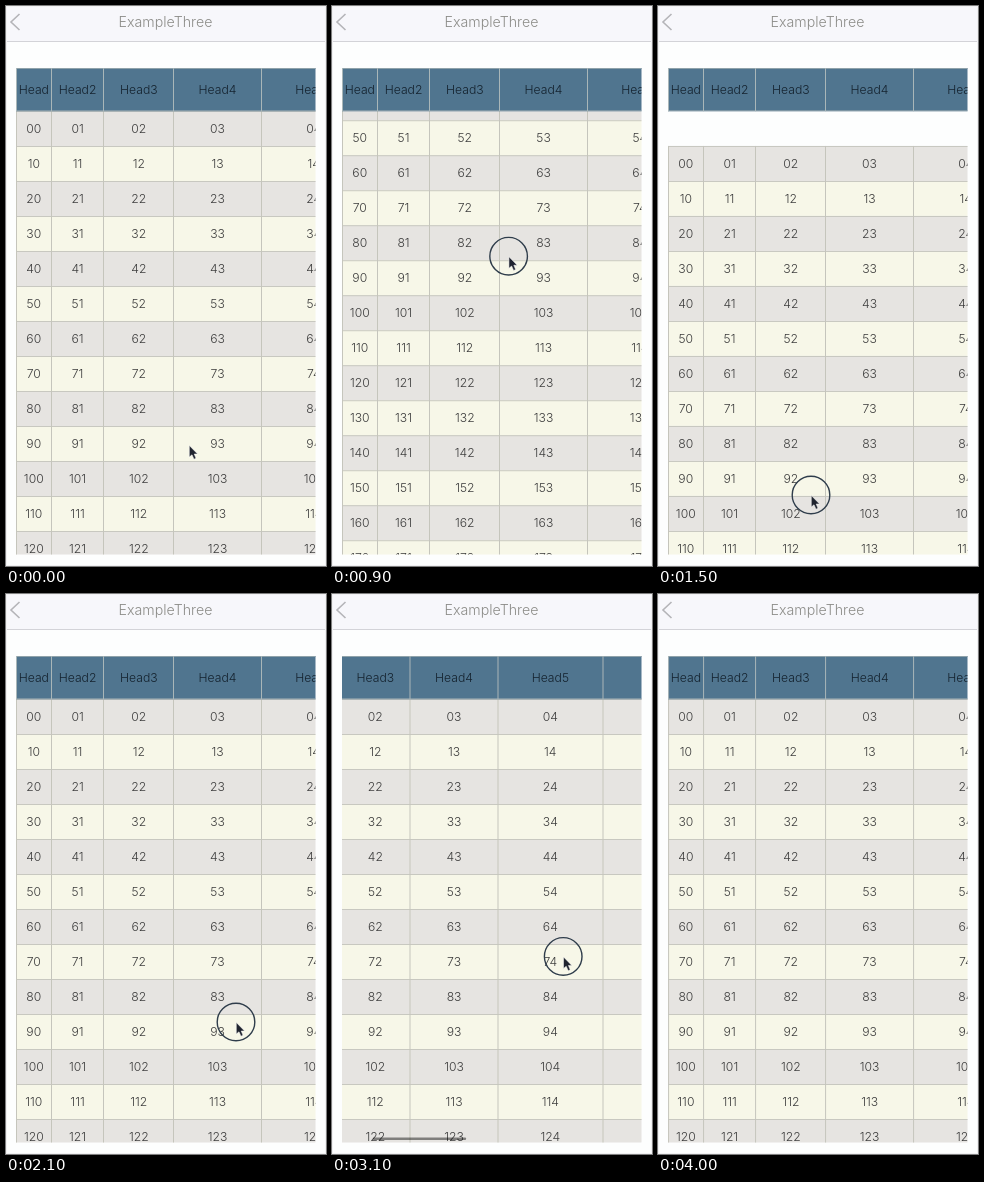
Write an HTML page that moves like this. It is 320x560 px and loops after 4.1 s.

```html
<!DOCTYPE html>
<html lang="en">
<head>
<meta charset="utf-8">
<title>ExampleThree</title>
<style>
  html, body { margin: 0; width: 100%; height: 100%; overflow: hidden; background: #fdfefe; }
  svg { display: block; width: 320px; height: 560px; }
  text { font: 300 12.2px Inter, "Open Sans", sans-serif; text-anchor: middle; fill: #3c3c3c; }
  .head text { fill: #14222e; }
  .title { font-size: 14.2px; fill: #8c8c88; }
</style>
</head>
<body>
<svg id="stage" viewBox="0 0 320 560">
  <defs>
    <clipPath id="headClip"><rect x="10" y="62" width="299.5" height="43.5"/></clipPath>
    <clipPath id="bodyClip"><rect x="10" y="105" width="299.5" height="443.5"/></clipPath>
  </defs>
  <rect width="320" height="560" fill="#fdfefe"/>
  <rect width="320" height="35" fill="#f7f7fb"/>
  <rect y="35" width="320" height="1" fill="#d3d3d8"/>
  <polyline points="13.5,8 5,16 13.5,24" fill="none" stroke="#b4b4b8" stroke-width="1.6"/>
  <text class="title" x="159.5" y="21">ExampleThree</text>
  <g clip-path="url(#bodyClip)"><g id="body"></g></g>
  <g clip-path="url(#headClip)"><g id="head" class="head"></g></g>
  <rect id="bar" y="543.5" height="2.4" rx="1.2" fill="#000" fill-opacity=".45"/>
  <g id="pointer">
    <circle id="ring" r="18.8" fill="none" stroke="#2f3d4b" stroke-width="1.4"/>
    <path d="M.3 .5V12L3 9.8L5 14.2L7 13.3L5.2 9H8.6Z" fill="#20242f" stroke="#fff" stroke-opacity=".7" stroke-width=".7"/>
  </g>
  <rect x=".5" y=".5" width="319" height="559" fill="none" stroke="#f0f0f2"/>
</svg>
<script>
const LOOP = 4100, STEP = 100;
const LEFT = 10, TOP = 105, ROW = 35, ROWS = 22, COLS = 9;
const VIEW_W = 300, VIEW_H = 443;
const $ = id => document.getElementById(id);

// Each column is half a row height wider than the one before it.
const colX = i => LEFT + ROW / 4 * i * (i + 3);
const tableW = colX(COLS) - LEFT;

function add(parent, tag, attrs, label) {
  const el = document.createElementNS('http://www.w3.org/2000/svg', tag);
  for (const k in attrs) el.setAttribute(k, attrs[k]);
  if (label !== undefined) el.textContent = label;
  parent.appendChild(el);
}
const box = (g, x, y, width, height, fill) => add(g, 'rect', { x, y, width, height, fill });
const label = (g, col, y, s) => add(g, 'text', { x: (colX(col) + colX(col + 1)) / 2 + .3, y }, s);

function columnLines(g, y, h, color) {
  for (let c = 0; c <= COLS; c++) box(g, Math.floor(colX(c)), y, 1, h, color);
}

function build() {
  const head = $('head'), body = $('body');
  box(head, LEFT, 62, tableW, 43.5, '#50758f');
  box(head, LEFT, 62, tableW, 1, '#8fa2aa');
  box(head, LEFT, 104.5, tableW, 1, '#a9b5b8');
  columnLines(head, 62, 43.5, '#a9b6b8');
  for (let c = 0; c < COLS; c++) label(head, c, 88, 'Head' + (c ? c + 1 : ''));

  for (let r = 0; r < ROWS; r++) {
    const y = TOP + r * ROW;
    box(body, LEFT, y, tableW, ROW, r % 2 ? '#f7f7e8' : '#e6e4e1');
    box(body, LEFT, y, tableW, 1, '#c8c8c0');
    for (let c = 0; c < COLS; c++) label(body, c, y + 22.2, `${r}${c}`);
  }
  columnLines(body, TOP, ROWS * ROW, '#c5c5bc');
}

const progress = (t, from, to) => Math.min(1, Math.max(0, (t - from) / (to - from)));
const smooth = k => k * k * (3 - 2 * k);
const mix = (a, b, k) => a + (b - a) * k;

// Where the hand turns or rests: time, x, y
const STOPS = [
  [0, 183, 439], [200, 182, 416], [700, 181, 206], [1500, 153, 489], [2100, 230, 428],
  [2400, 105, 405], [2700, 193, 367], [3400, 256, 359.5], [3900, 242, 543]
];
const GRAB = 200, DROP = 1500, FLICK = 2100, FLICK_BACK = 2900, EDGE = 3300;
const REACH = 195;
const within = (t, from, length) => t >= from && t <= from + length;

function pointerAt(t) {
  const i = Math.max(1, STOPS.findIndex(s => s[0] >= t));
  const [t0, x0, y0] = STOPS[i - 1], [t1, x1, y1] = STOPS[i];
  const k = smooth(progress(t, t0, t1));
  return [mix(x0, x1, k), mix(y0, y1, k)];
}

// Pulling past the top edge meets growing resistance.
function rubber(d) {
  const k = -d * .52 / VIEW_H;
  return d >= 0 ? d : -VIEW_H * k / (1 + k);
}

function scrollY(t) {
  if (t < GRAB) return 0;
  const pull = rubber(STOPS[1][2] - pointerAt(Math.min(t, DROP))[1]);
  return pull * (1 - progress(t, DROP, DROP + 400)) ** 2;
}

// A flick that glides out, then one back that overshoots and settles.
function scrollX(t) {
  if (t < FLICK_BACK) return REACH * (1 - (1 - progress(t, FLICK, 2700)) ** 2);
  if (t < EDGE) return mix(REACH, -16, smooth(progress(t, FLICK_BACK, EDGE)));
  return -16 * Math.exp((EDGE - t) / 132);
}

function draw(t) {
  const [px, py] = pointerAt(Math.min(t, 3900));
  const sx = scrollX(t), sy = scrollY(t);
  $('head').setAttribute('transform', `translate(${-sx} 0)`);
  $('body').setAttribute('transform', `translate(${-sx} ${-sy})`);

  const pressed = within(t, GRAB, DROP - GRAB) || within(t, FLICK - 100, 300) || within(t, FLICK_BACK, 200);
  $('pointer').setAttribute('transform', `translate(${px} ${py})`);
  $('pointer').style.display = t < 4000 ? '' : 'none';
  $('ring').style.display = pressed ? '' : 'none';

  const track = VIEW_W - 6, full = track * VIEW_W / tableW;
  $('bar').setAttribute('x', 13 + Math.max(0, sx) * track / tableW);
  $('bar').setAttribute('width', full + Math.min(0, sx));
  const shown = within(t, FLICK + 100, 400) || t > FLICK_BACK;
  $('bar').setAttribute('opacity', shown ? 1 - progress(t, 3500, 3800) : 0);
}

build();
const start = performance.now();
function tick() {
  const t = (performance.now() - start) % LOOP;
  draw(Math.floor(t / STEP) * STEP);
  requestAnimationFrame(tick);
}
tick();
</script>
</body>
</html>
```
